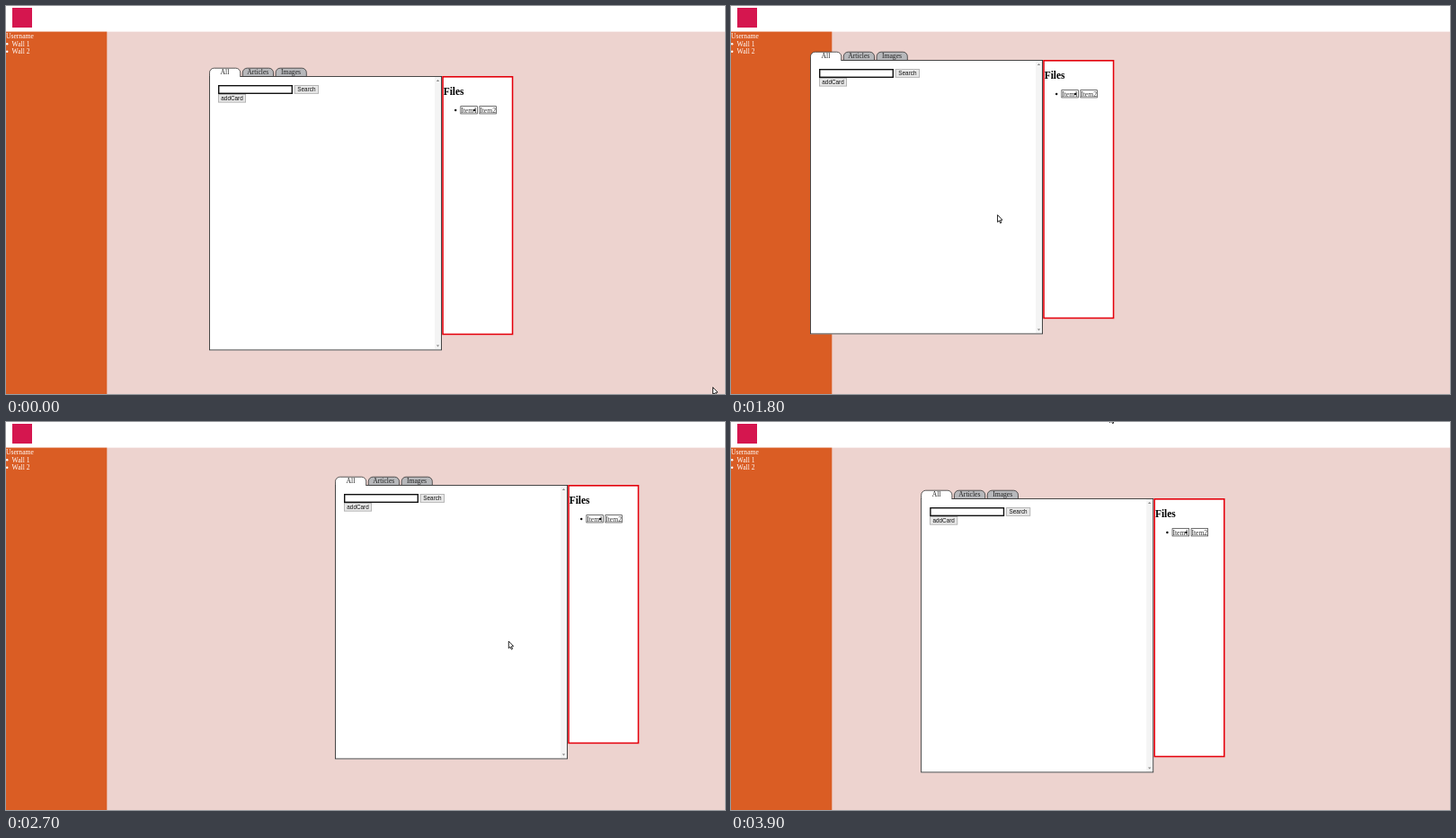
An HTML page with a canvas for the animation above (4 s loop, 800x432 px).

```html
<!DOCTYPE html>
<html lang="en">
<head>
<meta charset="utf-8">
<title>Draggable wall</title>
<style>
  html, body { margin: 0; width: 100%; height: 100%; overflow: hidden; background: #fff; }
  canvas { display: block; }
</style>
</head>
<body>
<canvas id="stage" width="800" height="432"></canvas>
<script>
const ctx = document.getElementById('stage').getContext('2d');
const LOOP = 4000, STEP = 100;
const GRAB = 12, RELEASE = 34;          // steps at which the drag starts and ends
const LEAD = 0.35;                      // the window trails the pointer by this many steps
const HOLD = { x: 193, y: 180 };        // where the pointer holds the window
const SERIF = '"Liberation Serif", serif';
const SANS = '"Liberation Sans", sans-serif';
const INK = '#333';

const key = (t, x, y) => ({ t, x, y });
const dragKeys = [
  key(GRAB, 226, 78), key(13, 234, 100), key(14, 181.6, 81), key(17, 78, 58),
  key(18, 88, 60), key(19, 136, 38), key(24, 297, 76), key(25, 294, 76),
  key(27, 366, 70), key(29, 323, 26), key(31, 243, 66), key(35, 211.2, 85)
];
const entry = key(0, 786, 424), exit = { x: 421, y: -8 };

const mix = (a, b, k) => a + (b - a) * k;
const mixPoint = (a, b, k) => ({ x: mix(a.x, b.x, k), y: mix(a.y, b.y, k) });

// Smooth curve through the keys, at rest at both ends
function spline(keys, t) {
  const last = keys.length - 1;
  if (t <= keys[0].t) return keys[0];
  if (t >= keys[last].t) return keys[last];
  const i = keys.findIndex(k => k.t > t) - 1;
  const a = keys[i], b = keys[i + 1], span = b.t - a.t, u = (t - a.t) / span;
  const slope = (j, axis) => j === 0 || j === last ? 0 :
    (keys[j + 1][axis] - keys[j - 1][axis]) / (keys[j + 1].t - keys[j - 1].t);
  const at = axis => mix(a[axis], b[axis], u * u * (3 - 2 * u)) +
    span * u * (1 - u) * (slope(i, axis) * (1 - u) - slope(i + 1, axis) * u);
  return { x: at('x'), y: at('y') };
}

function heldPointer(t) {
  const board = spline(dragKeys, t + LEAD);
  return { x: board.x + HOLD.x, y: board.y + HOLD.y };
}

function pointerAt(t) {
  if (t < GRAB) return mixPoint(entry, heldPointer(GRAB), t / GRAB);
  if (t < RELEASE) return heldPointer(t);
  const left = Math.max(0, 1 - (t - RELEASE) / 2.75);
  return mixPoint(exit, heldPointer(RELEASE), left * left);
}

function rect(x, y, w, h, fill) {
  ctx.fillStyle = fill;
  ctx.fillRect(x, y, w, h);
}

// Border drawn inside the given box
function border(x, y, w, h, color, width) {
  ctx.strokeStyle = color;
  ctx.lineWidth = width;
  ctx.strokeRect(x + width / 2, y + width / 2, w - width, h - width);
}

function text(str, x, y, color, font = `7.62px ${SERIF}`, align = 'left') {
  ctx.font = font;
  ctx.textAlign = align;
  ctx.fillStyle = color;
  ctx.fillText(str, x, y);
}

function bullet(x, y, color) {
  ctx.fillStyle = color;
  ctx.beginPath();
  ctx.arc(x, y, 1.2, 0, Math.PI * 2);
  ctx.fill();
}

function drawPage() {
  rect(0, 0, 800, 432, '#edd3cf');
  rect(0, 0, 800, 28.6, '#fff');
  rect(0, 28.6, 112.3, 404, '#da5d24');
  rect(7, 2, 22, 22, '#d5164f');
  text('Username', 0, 36, '#fff');
  ['Wall 1', 'Wall 2'].forEach((label, i) => {
    const y = 44.6 + i * 8.6;
    bullet(1.2, y - 2.4, '#fff');
    text(label, 6.6, y, '#fff');
  });
}

function tab(index, label, fill) {
  const x = index * 36.8;
  ctx.beginPath();
  ctx.roundRect(x + .5, -8.8, 34.2, 9.3, [5, 5, 0, 0]);
  ctx.fillStyle = fill;
  ctx.fill();
  ctx.strokeStyle = INK;
  ctx.lineWidth = .8;
  ctx.stroke();
  text(label, x + 17.4, -1.8, '#222', undefined, 'center');
}

function button(x, y, w, label) {
  rect(x, y, w, 9.5, '#e8e8e8');
  border(x, y, w, 9.5, '#aaa', .8);
  text(label, x + w / 2, y + 7, '#111', `6.35px ${SANS}`, 'center');
}

function scrollArrow(y, dir) {
  ctx.fillStyle = '#888';
  ctx.beginPath();
  ctx.moveTo(252.8, y + dir);
  ctx.lineTo(256.2, y + dir);
  ctx.lineTo(254.5, y - dir);
  ctx.fill();
}

function drawBoard() {
  rect(0, 0, 259, 305.4, '#fff');
  rect(251, 1, 7, 303, '#f4f4f4');
  border(0, 0, 259, 305.4, INK, .9);
  scrollArrow(5, 1);
  scrollArrow(300.5, -1);
  ['All', 'Articles', 'Images'].forEach((label, i) => tab(i, label, i ? '#b7b8bb' : '#fff'));
  rect(1, 0, 33.2, 2, '#fff');
  border(10, 10, 83, 10, '#111', 1.4);
  button(94.8, 10.2, 27.2, 'Search');
  button(10, 20, 31, 'addCard');
}

function drawFiles() {
  rect(259.2, 0, 79.2, 288.3, '#fff');
  border(259.2, 0, 79.2, 288.3, '#e3000b', 1.6);
  text('Files', 260.7, 21.4, '#000', `bold 11.43px ${SERIF}`);
  ['Item1', 'Item2'].forEach((label, i) => {
    const x = 279.5 + i * 21;
    border(x, 33.3, 19.3, 9, INK, .7);
    text(label, x + .7, 40.5, '#333');
    bullet(x - 5.3, 38, '#000');
  });
}

function drawPointer({ x, y }) {
  ctx.save();
  ctx.translate(x + .5, y + .5);
  ctx.fill(arrow);
  ctx.restore();
}

const arrow = new Path2D('M0 0V8L1.8 6.4 3.1 9.2 4.3 8.6 3.1 5.9 5.4 5.6Z');

function drawPointer({ x, y }) {
  ctx.save();
  ctx.translate(x + .5, y + .5);
  ctx.fillStyle = '#fff';
  ctx.fill(arrow);
  ctx.strokeStyle = '#111';
  ctx.lineWidth = .9;
  ctx.stroke(arrow);
  ctx.restore();
}

function render(now) {
  const step = Math.floor((now % LOOP) / STEP);
  const board = spline(dragKeys, step);
  drawPage();
  ctx.save();
  ctx.translate(board.x, board.y);
  drawBoard();
  drawFiles();
  ctx.restore();
  drawPointer(pointerAt(step));
}

const start = performance.now();
function tick() {
  render(performance.now() - start);
  requestAnimationFrame(tick);
}
tick();
</script>
</body>
</html>
```
